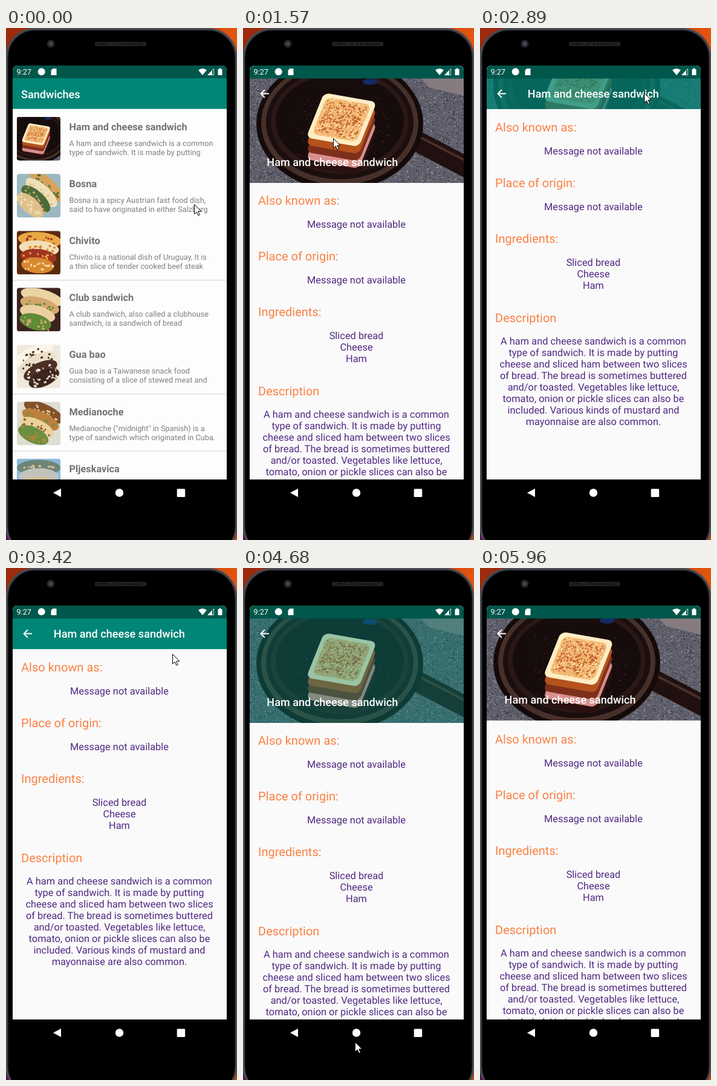
Recreate the animation shown at these times as an HTML page. Size 382 by 846 pixels, loop 6420 ms.

```html
<!DOCTYPE html>
<html lang="en">
<head>
<meta charset="utf-8">
<title>Sandwiches</title>
<style>
html, body { margin: 0; width: 100%; height: 100%; overflow: hidden; background: #000; }
svg { display: block; width: 382px; height: 846px; }
text { font-family: Roboto, "Noto Sans", sans-serif; text-rendering: geometricPrecision; white-space: pre; }
.bar { font-size: 18.1px; font-weight: 500; fill: #fff; }
.name { font-size: 16.3px; font-weight: 700; fill: #727272; }
.info { font-size: 12.72px; fill: #7f7f7f; }
.head { font-size: 20.05px; fill: #fb8145; }
.body { font-size: 16.4px; fill: #502a82; text-anchor: middle; }
</style>
</head>
<body>
<svg id="stage" viewBox="0 0 382 846" xmlns="http://www.w3.org/2000/svg"></svg>
<script>
const LOOP = 6420, STEP = 130, TEAL = '#008577', DARK_TEAL = '#00574b';

const rect = (x, y, w, h, fill, more = '') =>
  `<rect x="${x}" y="${y}" width="${w}" height="${h}" fill="${fill}" ${more}/>`;
const oval = (x, y, rx, ry, fill) => `<ellipse cx="${x}" cy="${y}" rx="${rx}" ry="${ry}" fill="${fill}"/>`;
const line = (d, color, width) =>
  `<path d="${d}" fill="none" stroke="${color}" stroke-width="${width}" stroke-linejoin="round"/>`;
const text = (x, y, cls, str) => `<text x="${x}" y="${y}" class="${cls}">${str}</text>`;
const clip = (id, x, y, w, h, r = 0) =>
  `<clipPath id="${id}">${rect(x, y, w, h, '#000', `id="${id}Box" rx="${r}"`)}</clipPath>`;

let seed = 7;
const random = () => (seed = seed * 16807 % 2147483647) / 2147483647;

// Short strokes scattered over a box.
function specks(count, x, y, w, h, size, fill) {
  let d = '';
  for (let i = 0; i < count; i++) {
    const length = (size * (.5 + random())).toFixed(1);
    d += `M${(x + w * random()).toFixed(1)} ${(y + h * random()).toFixed(1)}h${length}v${size}h-${length}z`;
  }
  return `<path d="${d}" fill="${fill}"/>`;
}

function panPhoto() {
  const rings = ['#150a0a', '#463029', '#1b0e0e', '#2a1816', '#170c0c'];
  const slices = ['#2a1010', '#d98f8c', '#7c301c', '#b5521e', '#ffedc4'];
  return rect(11, 83, 354, 173, '#5f5f6b') +
    specks(2200, 11, 83, 354, 173, 1.3, '#9a9aa8') + specks(2200, 11, 83, 354, 173, 1.3, '#2b2b34') +
    '<path d="M295 83H365V112L307 98Z" fill="#857b80"/>' +
    line('M282 184L385 238', '#211010', 34) + line('M292 180L385 228', '#4a2f29', 4) +
    rings.map((color, i) => oval(160, 158 - i, 138 - 8 * i, 110 - 8 * i, color)).join('') +
    specks(130, 75, 110, 165, 110, 1.4, '#4d2d27') + oval(210, 89, 12, 5, '#142b68') +
    slices.map((color, i) => `<g transform="matrix(.97 .17 -.4 1 134 ${155 - 12 * i})">
      ${rect(0, 0, 90, 74, color, 'rx="9"')}</g>`).join('') +
    `<g transform="matrix(.97 .17 -.4 1 134 107)">${rect(7, 6, 76, 61, '#f2b873', 'rx="9"')}
      ${specks(260, 10, 9, 68, 53, 2.2, '#c2602a')}${specks(130, 4, 4, 80, 64, 2, '#ffe3b0')}</g>`;
}

// A dish seen from above: tilted layers with crumbs on each.
function meal({ back, layers, tilt }) {
  const stack = layers.map((color, i) => oval(36, 15 + 14 * i, 36 - 3 * i, 13, color) +
    specks(18, 10, 8 + 14 * i, 50, 14, 3, layers[(i + 2) % layers.length]));
  return rect(0, 0, 72, 72, back) + `<g transform="rotate(${tilt} 36 36)">${stack.join('')}</g>`;
}

const dishes = [
  { name: 'Ham and cheese sandwich',
    info: ['A ham and cheese sandwich is a common', 'type of sandwich. It is made by putting'] },
  { name: 'Bosna', back: '#9bb8c0', tilt: 42, layers: ['#d5a35a', '#efe0b8', '#4c6a3a', '#e0c08a'],
    info: ['Bosna is a spicy Austrian fast food dish,', 'said to have originated in either Salzburg'] },
  { name: 'Chivito', back: '#5a2a10', tilt: 5, layers: ['#e8a846', '#f2dfb8', '#a13522', '#da882c'],
    info: ['Chivito is a national dish of Uruguay, It is', 'a thin slice of tender cooked beef steak'] },
  { name: 'Club sandwich', back: '#3b2420', tilt: 15, layers: ['#ecd3a4', '#d5a76d', '#ead0a0', '#5f8a35'],
    info: ['A club sandwich, also called a clubhouse', 'sandwich, is a sandwich of bread'] },
  { name: 'Gua bao', back: '#efe8dc', tilt: -25, layers: ['#fbf5e8', '#eadfc9', '#4d2f24', '#3d261e'],
    info: ['Gua bao is a Taiwanese snack food', 'consisting of a slice of stewed meat and'] },
  { name: 'Medianoche', back: '#dfddd2', tilt: 25, layers: ['#84522a', '#bc803c', '#ead19c', '#6b9040'],
    info: ['Medianoche ("midnight" in Spanish) is a', 'type of sandwich which originated in Cuba.'] },
  { name: 'Pljeskavica', back: '#8cb8dc', tilt: 0, layers: ['#6d8578', '#c2c4bc', '#d8c090', '#c2c4bc'],
    info: [] }
];

const panThumb = '<use href="#pan" transform="translate(-36 -34.5) scale(.416)"/>';
const dishRow = (dish, i) => `<g transform="translate(0 ${94.1 * i})">
  <g transform="translate(18 147)" clip-path="url(#thumb)">${dish.layers ? meal(dish) : panThumb}</g>
  ${text(104.5, 169, 'name', dish.name)}
  ${dish.info.map((str, j) => text(104.5, 195 + 15 * j, 'info', str)).join('')}
  ${rect(11, 228, 354, 1, '#d2d2d2', [2, 4, 5].includes(i) ? '' : 'class="faint"')}</g>`;

const story = ['A ham and cheese sandwich is a common', 'type of sandwich. It is made by putting',
  'cheese and sliced ham between two slices', 'of bread. The bread is sometimes buttered',
  'and/or toasted. Vegetables like lettuce,', 'tomato, onion or pickle slices can also be',
  'included. Various kinds of mustard and', 'mayonnaise are also common.'];
const section = (title, y, lines) => text(25, y, 'head', title) +
  lines.map((str, i) => text(187.5, y + 37.7 + 19 * i, 'body', str)).join('');

const phone = `
  ${rect(0, 0, 382, 846, 'url(#wall)')}${rect(0, 700, 30, 146, '#5a1258')}${rect(352, 780, 30, 66, '#c2451a')}
  ${rect(1.5, 2, 379, 868, '#000', 'rx="46" stroke="#3b3d43" stroke-width="4"')}
  ${rect(.5, .8, 381, 870, 'none', 'rx="47" stroke="#60636b"')}
  ${oval(74, 26, 6.5, 6.5, '#242528')}${oval(74, 26, 3.5, 3.5, '#41454e')}
  ${rect(147, 23, 85, 7, '#262626', 'rx="3"')}${specks(170, 149, 24, 80, 4, 1, '#0c0c0c')}`;

const statusIcons = `
  <text x="17.5" y="77" font-size="12.7" fill="#fff">9:27</text>
  ${oval(58.7, 72.3, 6, 6, '#fff')}
  <g fill="#fff"><path d="M77.5 67H83.5V78H74.5V70Z"/><path d="M318 69.5Q325 64.5 332 69.5L325 78Z"/>
  <path d="M333.5 78L341 70V78Z"/><path d="M350.5 68H352.5V66.5H355.5V68H357.5V78H350.5Z"/></g>
  ${line('M333.8 77.6L343.6 67.4V77.6Z', '#fff', .8)}`;

const navIcons = `
  <path d="M78 768L91 761V775Z" fill="#fff"/>${oval(187.5, 768, 6.7, 6.7, '#fff')}
  ${rect(282.7, 761.5, 13.5, 13.5, '#fff', 'rx="1.5"')}`;

document.getElementById('stage').innerHTML = `
  <defs>
    <linearGradient id="wall"><stop stop-color="#9c2b0c"/><stop offset=".5" stop-color="#a9220c"/>
      <stop offset="1" stop-color="#e2560f"/></linearGradient>
    <g id="pan">${panPhoto()}</g>
    ${clip('screen', 11, 62, 354, 742, 8)}${clip('page', 11, 62, 354, 684)}
    ${clip('thumb', 0, 0, 72, 72, 4)}${clip('photo', 11, 83, 354, 173)}
  </defs>
  ${phone}
  <g clip-path="url(#screen)">
    <g id="list"><g clip-path="url(#page)">
      ${rect(11, 62, 354, 684, '#fdfdfd')}${dishes.map(dishRow).join('')}
      ${rect(11, 62, 354, 21.5, DARK_TEAL)}${rect(11, 83, 354, 50.7, TEAL)}${text(25, 115.5, 'bar', 'Sandwiches')}
    </g></g>
    <g id="detail">
      ${rect(11, 746, 354, 60, '#000')}
      <g clip-path="url(#page)">
        ${rect(11, 62, 354, 684, '#fafafa')}
        <g id="content">
          ${section('Also known as:', 292, ['Message not available'])}
          ${section('Place of origin:', 384, ['Message not available'])}
          ${section('Ingredients:', 476, ['Sliced bread', 'Cheese', 'Ham'])}
          ${section('Description', 606.5, story)}
        </g>
        <g clip-path="url(#photo)"><use id="picture" href="#pan"/>${rect(11, 83, 354, 173, TEAL, 'id="scrim"')}</g>
        ${rect(11, 62, 354, 21.5, DARK_TEAL)}
        ${line('M43 108.5H30M36 102L29.5 108.5L36 115', '#fff', 1.8)}
        <g id="title">${text(0, 0, 'bar', dishes[0].name)}</g>
      </g>
    </g>
    ${statusIcons}
  </g>
  ${navIcons}
  <path id="cursor" d="M.5 .5V16.5L4.2 13L6.8 18.8L9.3 17.7L6.7 12H11.8Z" fill="#fff" stroke="#000"/>`;

// Where the hand turns or rests: time, x, y.
const stops = [
  [0, 311, 291], [620, 149, 174], [1300, 149, 174], [1560, 149, 182], [2210, 228, 373], [2340, 228, 340],
  [2470, 228, 247], [2600, 234, 177], [2990, 290, 72], [3380, 275, 142], [3640, 245, 525], [3900, 230, 347],
  [4290, 230, 392], [4680, 185, 783], [5200, 90, 217], [5460, 218, 839], [5590, 218, 900]
];

const ramp = (t, from, to) => Math.min(1, Math.max(0, (t - from) / (to - from)));
const mix = (a, b, p) => a + (b - a) * p;
function pointer(t) {
  const next = stops.findIndex(stop => stop[0] > t);
  if (next < 0) return stops.at(-1).slice(1);
  const [from, to] = [stops[next - 1], stops[next]];
  const p = ramp(t, from[0], to[0]);
  return [mix(from[1], to[1], p), mix(from[2], to[2], p)];
}

const set = (id, name, value) => document.getElementById(id).setAttribute(name, value);
const move = (id, x, y) => set(id, 'transform', `translate(${x} ${y})`);
const zoom = (id, s) => set(id, 'transform', `translate(${187.5 * (1 - s)} ${433 * (1 - s)}) scale(${s})`);

function draw(t) {
  const open = ramp(t, 1170, 1560);
  zoom('list', 1 + .055 * Math.sqrt(open));
  zoom('detail', 1 - .1215 * (1 - open) ** 2);
  set('detail', 'opacity', Math.min(1, 2.1 * open));
  document.querySelectorAll('.faint').forEach(rule => rule.setAttribute('opacity', Math.ceil(open)));

  // The header folds with the drag; the content trails it slightly.
  const unfold = ramp(t, 4290, 4550), rebound = ramp(t, 4680, 4810);
  const collapse = 122 * (ramp(t, 2210, 2476) - unfold) + 4 * rebound;
  const scroll = 121 * (ramp(t, 2210, 2524) - unfold) + 2 * rebound;
  const folded = collapse / 122;
  move('content', 0, -scroll);
  move('picture', 0, -collapse / 2);
  move('title', mix(39.3, 78.8, folded), mix(227.7, 114.7, folded));
  set('photoBox', 'height', 173 - collapse);
  set('scrim', 'opacity', ramp(t, 2470, 2990) - ramp(t, 4290, 4940));
  move('cursor', ...pointer(t));
}

function tick() {
  const t = performance.now() % LOOP;
  draw(Math.floor(t / STEP) * STEP);
  requestAnimationFrame(tick);
}
tick();
</script>
</body>
</html>
```
